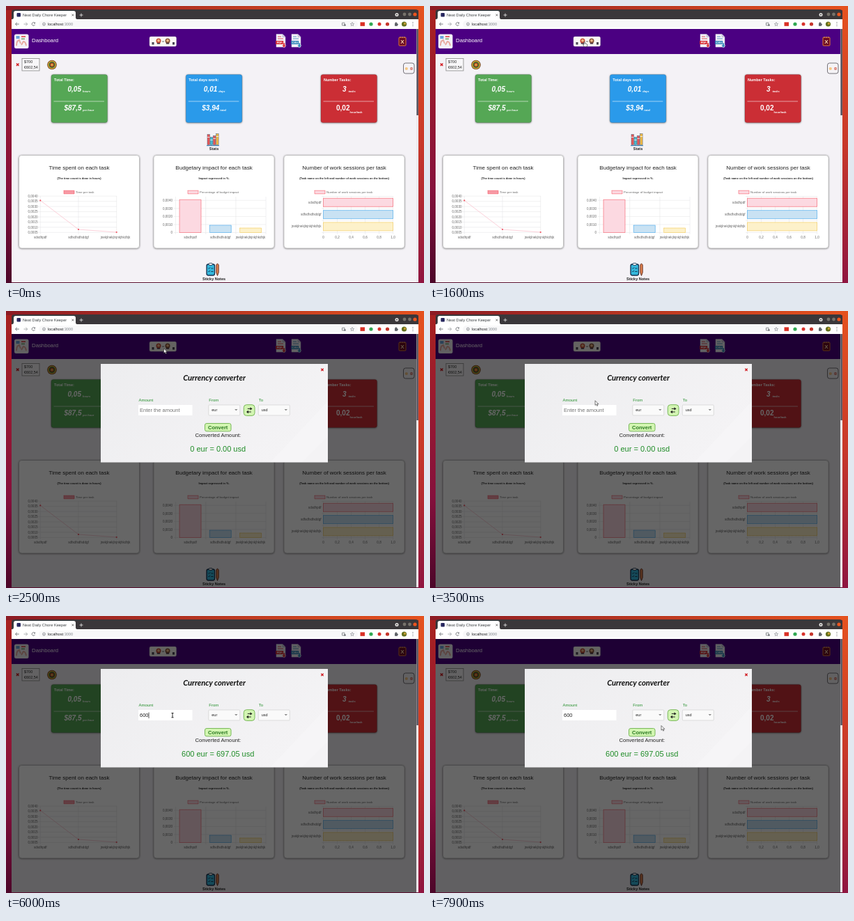
An HTML page for the animation above (8 s loop, 600x398 px).

```html
<!DOCTYPE html>
<html lang="en">
<head>
<meta charset="utf-8">
<title>Dashboard</title>
<style>
html, body { margin: 0; width: 100%; height: 100%; overflow: hidden; background: #8c1a30; }
svg { display: block; width: 600px; height: 398px; font-family: "Liberation Sans", Arial, sans-serif; }
text { white-space: pre; }
</style>
</head>
<body>
<svg id="stage" viewBox="0 0 600 398"></svg>
<script>
const LOOP = 8000, OPEN = 1740, RATE = 1.16175;

// Drawing helpers: each returns SVG markup
const text = (x, y, size, str, fill = '#222', more = '') =>
  `<text x="${x}" y="${y}" font-size="${size}" fill="${fill}" ${more}>${str}</text>`;
const rect = (x, y, w, h, fill, more = '') =>
  `<rect x="${x}" y="${y}" width="${w}" height="${h}" fill="${fill}" ${more}/>`;
const disc = (x, y, r, fill, more = '') => `<circle cx="${x}" cy="${y}" r="${r}" fill="${fill}" ${more}/>`;
const path = (d, stroke, width = 0.6, fill = 'none') =>
  `<path d="${d}" stroke="${stroke}" stroke-width="${width}" fill="${fill}"/>`;
const cross = (x, y, r, color, w) =>
  path(`M${x - r} ${y - r}L${x + r} ${y + r}M${x + r} ${y - r}L${x - r} ${y + r}`, color, w);
const gradient = (id, x2, y2, ...colors) =>
  `<linearGradient id="${id}" x2="${x2}" y2="${y2}">${colors.map((c, i) =>
    `<stop offset="${i / (colors.length - 1)}" stop-color="${c}"/>`).join('')}</linearGradient>`;
const MID = 'text-anchor="middle"', END = 'text-anchor="end"', BOLD = 'font-weight="bold"';
const SLANT = BOLD + ' font-style="italic"';

const defs = `<defs>
  ${gradient('left', 0, 1, '#a9221f', '#981a30', '#85103c', '#4c0629')}
  ${gradient('right', 0, 1, '#e5521f', '#c8382a', '#8f1540')}
  ${gradient('top', 1, 0, '#8c1b24', '#e5521f')}
  ${gradient('paper', 1, 0.5, '#ededef', '#f4f3f5')}
  <filter id="shadow" x="-10%" y="-10%" width="120%" height="120%">
    <feDropShadow dx="0" dy="0.5" stdDeviation="1.3" flood-opacity="0.55"/></filter>
  <clipPath id="view">${rect(8, 33, 581, 364, '#000')}</clipPath></defs>`;

function browser() {
  const ink = '#5f6368';
  return rect(0, 0, 8, 398, 'url(#left)') + rect(592, 0, 8, 398, 'url(#right)') +
    rect(0, 0, 600, 6, 'url(#top)') + rect(8, 396, 584, 2, '#5a1030') +
    path('M8 20V9Q8 5 12 5H588Q592 5 592 9V20Z', 'none', 0, '#3a373a') +
    path('M9 19Q11 19 11 16V10Q11 7 14 7H97Q100 7 100 10V16Q100 19 102 19Z', 'none', 0, '#fff') +
    rect(15.5, 10, 5.5, 5.5, '#28285f', 'rx="1"') +
    text(24, 15.3, 5.7, 'Neat Daily Chore Keeper', '#3c4043') +
    cross(95.8, 13, 1.4, '#444', 0.7) + path('M105.5 13H110.5M108 10.5V15.5', '#eee', 0.8) +
    disc(561, 12.5, 2.5, '#e6e4e2') + disc(561, 12.5, 0.9, '#3a373a') +
    disc(572, 12, 2.4, '#77736c') + disc(579.5, 12, 2.4, '#77736c') + disc(587, 12, 2.6, '#e95420') +
    rect(8, 19, 584, 14, '#fff') + rect(47, 21, 458, 10, '#f8f8f9', 'rx="5"') +
    path('M18.8 26H13.5M16 23.7L13.5 26L16 28.3', ink, 0.8) +
    path('M25.5 26H30.8M28.3 23.7L30.8 26L28.3 28.3', '#9a9da0', 0.8) +
    path('M41.3 24.5A2.3 2.3 0 1 0 41.6 26.8M41.6 23.4V25H39.9', ink, 0.8) +
    disc(54.5, 26, 2, 'none', `stroke="${ink}" stroke-width="0.6"`) + path('M54.5 25.5V27.2', ink) +
    text(60, 28.1, 5.6, 'localhost<tspan fill="#80868b">:3000</tspan>', '#202124') +
    path('M482.5 24.2H486V27.8H482.5Z', ink, 0.7) + disc(486.5, 27.4, 1.2, ink) +
    path('M497 23.5L497.8 25.2L499.6 25.4L498.2 26.6L498.6 28.4L497 27.5L495.4 28.4L495.8 26.6L494.4 25.4L496.2 25.2Z', ink, 0.5) +
    rect(508.5, 23.3, 6.5, 5.5, '#d93025') + disc(524, 26, 2.6, '#31a852') +
    disc(536, 26, 2.5, '#d8322c') + disc(547.5, 26, 2.6, '#c5352b') +
    path('M558 24.5H559V23.2H560.6V24.5H562V26H563V27.3H562V28.7H558Z', 'none', 0, ink) +
    disc(571.5, 26, 3.6, '#64701e') + disc(572.5, 25.3, 1.5, '#d2a338') +
    [23.7, 26, 28.3].map(y => disc(584, y, 0.6, ink)).join('') +
    rect(589, 33, 3, 364, '#eceaee') + rect(589.4, 33, 2.4, 124, '#4c4854');
}

function fileIcon(x, color, label) {
  return path(`M${x} 40.5H${x + 9}L${x + 13} 44.5V59H${x}Z`, '#c9c9dd', 0.5, '#f4f2f8') +
    path(`M${x + 9} 40.5V44.5H${x + 13}`, '#9898b8', 0.5, '#d5d5e6') +
    rect(x - 0.8, 50, 11, 5, color) + text(x + 4.7, 54, 4, label, '#fff', `${MID} ${BOLD}`) +
    path(`M${x + 2} 44H${x + 7}M${x + 2} 47H${x + 10}`, color, 0.8) +
    path(`M${x + 9.8} 53H${x + 12.3}V56.3H${x + 14}L${x + 11} 60L${x + 8} 56.3H${x + 9.8}Z`, '#fff', 0.4, color);
}

function header() {
  return rect(8, 33, 581, 36, '#4b0082') +
    rect(12, 40.5, 20.5, 20.5, '#f3f2f7', 'rx="2.5"') +
    path('M15 57Q15 50 19 49L21 54M29 57Q28 51 25 51L22 56', '#e8aaa0', 2) +
    rect(14.5, 43, 5, 4, '#6aa5db') + rect(22, 43, 6, 2, '#e26666') + rect(22, 46.5, 5, 1.6, '#77aa70') +
    text(37, 51.5, 7.8, 'Dashboard', '#fff') +
    rect(206, 44, 38.5, 14, '#faf8f4', 'rx="2" stroke="#ccc" stroke-width=".4"') +
    [[219, '#c54b35'], [232, '#825036']].map(([x, c]) =>
      disc(x, 50, 3.5, c) + disc(x, 49.7, 1.9, '#eeb886') + rect(x - 2.2, 53, 4.4, 1.6, '#4b3442')).join('') +
    rect(209.5, 52, 3, 3.5, '#4b4754') + rect(239, 52, 3, 3.5, '#4b4754') + path('M224 51H227', '#444', 0.8) +
    fileIcon(388, '#d62d34', 'PDF') + fileIcon(410, '#3185b8', 'CSV') +
    rect(564, 45, 10, 12, '#6d0b24', 'rx="1" stroke="#e07a31" stroke-width="1"') +
    path('M566 44V46M569 44V46M572 44V46', '#e8b080', 0.7) +
    text(569, 54.2, 8, 'X', '#f4d5b0', `${MID} ${BOLD}`);
}

function wallet() {
  return cross(16.7, 84.3, 1.8, '#d11920', 1.4) +
    rect(23, 75.5, 25, 17.5, '#f8f7f9', 'stroke="#888" stroke-width=".8"') +
    text(26, 82.3, 5.5, '$700') + text(26, 90.3, 5.5, '€602,54') +
    disc(66, 84.5, 6.8, '#6b3f1c') +
    disc(66, 84.5, 5.2, '#3d6a2c', 'stroke="#d9a83c" stroke-width="1.4"') +
    disc(66, 84.5, 2.9, '#b5472a') + disc(66, 84.5, 1.5, '#e4b847') +
    rect(570.5, 82, 15.5, 15, '#f5f3f6', 'rx="3" stroke="#55515a" stroke-width=".8"') +
    disc(574.8, 90, 2.1, '#f6c783') + disc(582, 90, 2.1, '#d46b60') + path('M580.3 90H583.7', '#fff', 0.7);
}

function counter(x, color, title, first, second) {
  const value = ([dx, num, ux, unit], y, style = SLANT, drop = 0) =>
    text(x + dx, y, 10, num, '#fff', style) + text(x + ux, y + 1 + drop, 4, unit, '#fff', style);
  const plain = x > 400;
  return rect(x, 98.5, 80.5, 69, color, 'rx="3" filter="url(#shadow)" stroke="#0003" stroke-width=".7"') +
    text(x + 4, 108.3, 5.5, title, '#fff', BOLD) + value(first, 123) +
    path(`M${x + 3.5} 137H${x + 76}`, '#ffffffb0', 0.8) +
    value(second, 150.3, plain ? BOLD : SLANT, plain ? 3 : 0);
}

const PINK = ['#fcd9e1', '#f5505e'], BLUE = ['#c9e2f3', '#36a2eb'], GOLD = ['#fdf1ca', '#f2c64b'];
const TASKS = ['sdsdhpdf', 'sdfsdfsdfsddgf', 'jnekjlnekjlnjnkjhkdhjk'];
const GREY = '#666', GRID = '#e3e3e5';
const bar = (x, y, w, h, [fill, edge]) =>
  rect(x, y, w, h, fill, `stroke="${edge}" stroke-width=".8" stroke-dasharray="1.4 .6"`);

function panel(x, title, note, legendX, legend, swatch) {
  const mid = x + 86.5;
  return rect(x, 214.5, 173, 133.5, '#fff', 'rx="4" filter="url(#shadow)" stroke="#999" stroke-width=".5"') +
    text(mid, 235.3, 8, title, '#222', MID) + text(mid, 248.8, 4, note, '#222', `${MID} ${BOLD}`) +
    bar(legendX, 265.2, 15, 4.6, swatch) + text(legendX + 17, 269.2, 4.4, legend, GREY);
}

function lineChart() {
  let out = panel(18.5, 'Time spent on each task', '(The time count is done in hours)', 83, 'Time per task', ['#f79aa5', '#f5505e']);
  for (let i = 0; i < 8; i++) {
    const y = 273.2 + i * 7.45;
    out += path(`M46.5 ${y}H159`, GRID, 0.5) + text(45.5, y + 1.7, 4.6, `0,00${String(40 - 5 * i).padStart(2, '0')}`, GREY, END);
  }
  const points = [[49.3, 279.4], [104, 321], [158.7, 325]];
  points.forEach(([x], i) => {
    out += path(`M${x} 273V328`, GRID, 0.5) + text(i < 2 ? x : 157, 333.5, 4.6, TASKS[i], GREY, MID);
  });
  return out + path('M' + points.join('L'), '#fbccd6', 0.9) +
    points.map(([x, y]) => disc(x, y, 1.1, '#f0505e')).join('');
}

function barChart() {
  let out = panel(212, 'Budgetary impact for each task', 'Impact expressed in %.', 261, 'Percentage of budget impact', PINK);
  for (let i = 0; i < 5; i++) {
    const y = 279.3 + i * 11.55;
    out += path(`M241 ${y}H373`, GRID, 0.5) + text(239, y + 1.7, 4.6, i < 4 ? `0,00${4 - i}0` : '0', GREY, END);
  }
  for (let i = 0; i < 4; i++) out += path(`M${243.5 + i * 43.2} 274V328`, GRID, 0.5);
  [[278.3, PINK], [315, BLUE], [319, GOLD]].forEach(([y, color], i) => {
    const x = 249 + i * 43.3;
    out += bar(x, y, 31, 325.5 - y, color) + text(x + 15.5, 333.5, 4.6, TASKS[i], GREY, MID);
  });
  return out;
}

function sessionChart() {
  let out = panel(399, 'Number of work sessions per task', '(Task name on the left and number of work sessions on the bottom)', 443, 'Number of work sessions per task', PINK);
  for (let i = 0; i < 6; i++) {
    const x = 455.5 + i * 20;
    out += path(`M${x} 273.5V328`, GRID, 0.5) +
      text(x, 333.8, 4.6, i ? (i / 5).toFixed(1).replace('.', ',') : '0', GREY, MID);
  }
  [PINK, BLUE, GOLD].forEach((color, i) => {
    const y = 276.3 + i * 17.3;
    out += path(`M453 ${y - 2.8}H555.5`, GRID, 0.5) + bar(455.5, y, 100, 12, color) +
      text(452.5, y + 7.4, 4.6, TASKS[i], GREY, END);
  });
  return out + path('M453 325.5H555.5', GRID, 0.5);
}

function sectionIcons() {
  const colors = ['#e65757', '#43bcd0', '#e65757', '#efb945'];
  const bars = [15, 11, 13, 16].map((h, i) =>
    rect(289 + i * 4.2, 199.5 - h, 3.5, h, colors[i], 'stroke="#4a6078" stroke-width=".5"') +
    path(`M${289 + i * 4.2} ${203.5 - h}h3.5`, '#fff', 0.8));
  return bars.join('') + path('M288 200.5H306', '#4886b4', 1.3) +
    text(298.5, 207.2, 5.5, 'Stats', '#222', `${MID} ${BOLD}`) +
    rect(288, 371, 11.5, 16, '#35b8dc', 'rx="2.5" stroke="#142f4d" stroke-width="1.3"') +
    rect(291.2, 369.5, 5, 3, '#f4f4f4', 'rx="1" stroke="#142f4d" stroke-width=".8"') +
    path('M290.3 376.5L291.3 377.5L293 375.5M290.3 381L291.3 382L293 380M294.3 377H297.5M294.3 381.5H297.5', '#142f4d', 0.9) +
    path('M301.8 372Q303.5 368.5 305.2 372V383L303.5 387.5L301.8 383Z', '#5a2c21', 0.9, '#e2824e') +
    text(298.5, 393.7, 5.5, 'Sticky Notes', '#222', `${MID} ${BOLD}`);
}

const page = rect(8, 33, 581, 364, '#f4f2f6') + header() + wallet() +
  counter(65, '#55a755', 'Total Time:', [23.5, '0,05', 45, 'hours'], [18.5, '$87,5', 45, 'per hour']) +
  counter(258.3, '#2a9aea', 'Total days work:', [25.5, '0,01', 47, 'days'], [23, '$3,94', 49, 'total']) +
  counter(452, '#cb2f35', 'Number Tasks:', [31, '3', 39.5, 'tasks'], [22, '0,02', 41.5, 'hour/task']) +
  sectionIcons() + lineChart() + barChart() + sessionChart();

function modal() {
  const green = '#25902c';
  const select = (x, value) =>
    rect(x, 135, 45, 15, '#fafafa', 'rx="1" stroke="#d0d0d0" stroke-width=".7"') +
    text(x + 4.5, 144.4, 5.5, value) + path(`M${x + 37.3} 141H${x + 41.7}L${x + 39.5} 143.3Z`, 'none', 0, '#888');
  const lime = 'stroke="#79b85a" stroke-width="1"';
  return rect(136, 76, 326, 141.5, 'url(#paper)') +
    path('M380 217L462 130V180L425 217Z', 'none', 0, '#ffffff30') +
    text(299, 100.3, 11.2, 'Currency converter', '#111', `${MID} font-family="Lato, cursive" font-weight="bold" font-style="italic"`) +
    cross(454, 84.4, 1.7, '#d11920', 1.3) +
    text(190.5, 130.3, 6, 'Amount', green) + text(291.3, 129.7, 6, 'From', green) + text(362.8, 129.7, 6, 'To', green) +
    rect(190, 135, 77.5, 15, '#fff') + `<text id="amount" x="192" y="145.2" font-size="7.5"></text>` +
    `<g id="caret">${path('M205 138.5V147', '#111', 0.7)}</g>` +
    select(290.8, 'eur') + select(362.3, 'usd') +
    rect(341.3, 134.7, 15.7, 15.7, '#d3f5b3', `rx="4" ${lime}`) +
    path('M346.8 140.4H351M347.6 145H351.8', '#222', 1) +
    path('M350.5 138.2L353.6 140.4L350.5 142.6ZM348 142.8L344.9 145L348 147.2Z', 'none', 0, '#222') +
    rect(285.5, 161.5, 37.5, 11.3, '#d3f6b2', `rx="2.5" ${lime}`) +
    text(304.2, 169.8, 7.5, 'Convert', '#2b7922', `${MID} ${BOLD}`) +
    text(304.3, 181.3, 7.7, 'Converted Amount:', '#222', MID) +
    `<text id="result" x="304.2" y="201.8" font-size="11" fill="#1f8c27" ${MID}></text>`;
}

const cursors = {
  arrow: path('M0 0V6.6L1.6 5.2L2.7 7.6L3.9 7L2.8 4.8H4.8Z', '#222', 0.6, '#fff'),
  hand: path('M0 0Q1 -.8 1.4 .4V2.4L4 3Q5 3.3 4.8 4.6L4 7H.6L-1.6 4.2Q-1.2 3.2 0 4Z', '#222', 0.6, '#fff'),
  beam: path('M-1.5 -3H1.5M0 -3V3.3M-1.5 3.3H1.5', '#111', 0.9)
};

const stage = document.getElementById('stage');
stage.innerHTML = defs + browser() + page +
  `<g id="overlay" clip-path="url(#view)">${rect(8, 33, 581, 364, '#000', 'opacity=".6"')}<g id="modal">${modal()}</g></g>` +
  Object.entries(cursors).map(([id, art]) => `<g id="${id}">${art}</g>`).join('');
const el = id => document.getElementById(id);
const show = (id, on) => el(id).setAttribute('display', on ? 'inline' : 'none');

// Pointer stops: time, x, y
const stops = [[600, 300, 412], [1250, 221, 52], [1950, 221, 51], [2300, 226.5, 54], [2900, 226.5, 54],
  [3700, 239, 142.5], [6500, 239, 142.5], [7300, 332, 157.5]];
const keyTimes = [5300, 5500, 5700];

function pointer(t) {
  const next = stops.findIndex(s => s[0] > t);
  if (next < 1) return stops[next < 0 ? stops.length - 1 : 0].slice(1);
  const a = stops[next - 1], b = stops[next];
  const u = (t - a[0]) / (b[0] - a[0]), k = u * u * (3 - 2 * u);
  return [a[1] + (b[1] - a[1]) * k, a[2] + (b[2] - a[2]) * k];
}

function draw(t) {
  const open = t >= OPEN;
  const left = (1 - Math.min(1, Math.max(0, (t - OPEN) / 400))) ** 2.75;
  show('overlay', open);
  el('modal').setAttribute('transform', `translate(0 ${-300 * left})`);
  el('modal').setAttribute('opacity', 1 - left ** 1.2);

  const typed = '600'.slice(0, keyTimes.filter(k => t >= k).length);
  el('amount').textContent = typed || 'Enter the amount';
  el('amount').setAttribute('fill', typed ? '#222' : '#757575');
  el('result').textContent = `${+typed} eur = ${(typed * RATE).toFixed(2)} usd`;
  const since = t - (typed ? keyTimes[typed.length - 1] : 4800);
  show('caret', t >= 4800 && t < 7200 && since % 1000 < 500);
  el('caret').setAttribute('transform', `translate(${(typed.length - 3) * 4.17} 0)`);

  const [x, y] = pointer(t);
  const inside = (x0, y0, x1, y1) => x > x0 && x < x1 && y > y0 && y < y1;
  const kind = open && (t >= 1820 && t < 2000 || inside(190, 135, 267.5, 150)) ? 'beam'
    : !open && inside(206, 44, 244, 58) ? 'hand' : 'arrow';
  for (const id in cursors) {
    show(id, id === kind);
    el(id).setAttribute('transform', `translate(${x} ${y})`);
  }
}

const start = performance.now();
(function frame() {
  draw((performance.now() - start) % LOOP);
  requestAnimationFrame(frame);
})();
</script>
</body>
</html>
```
